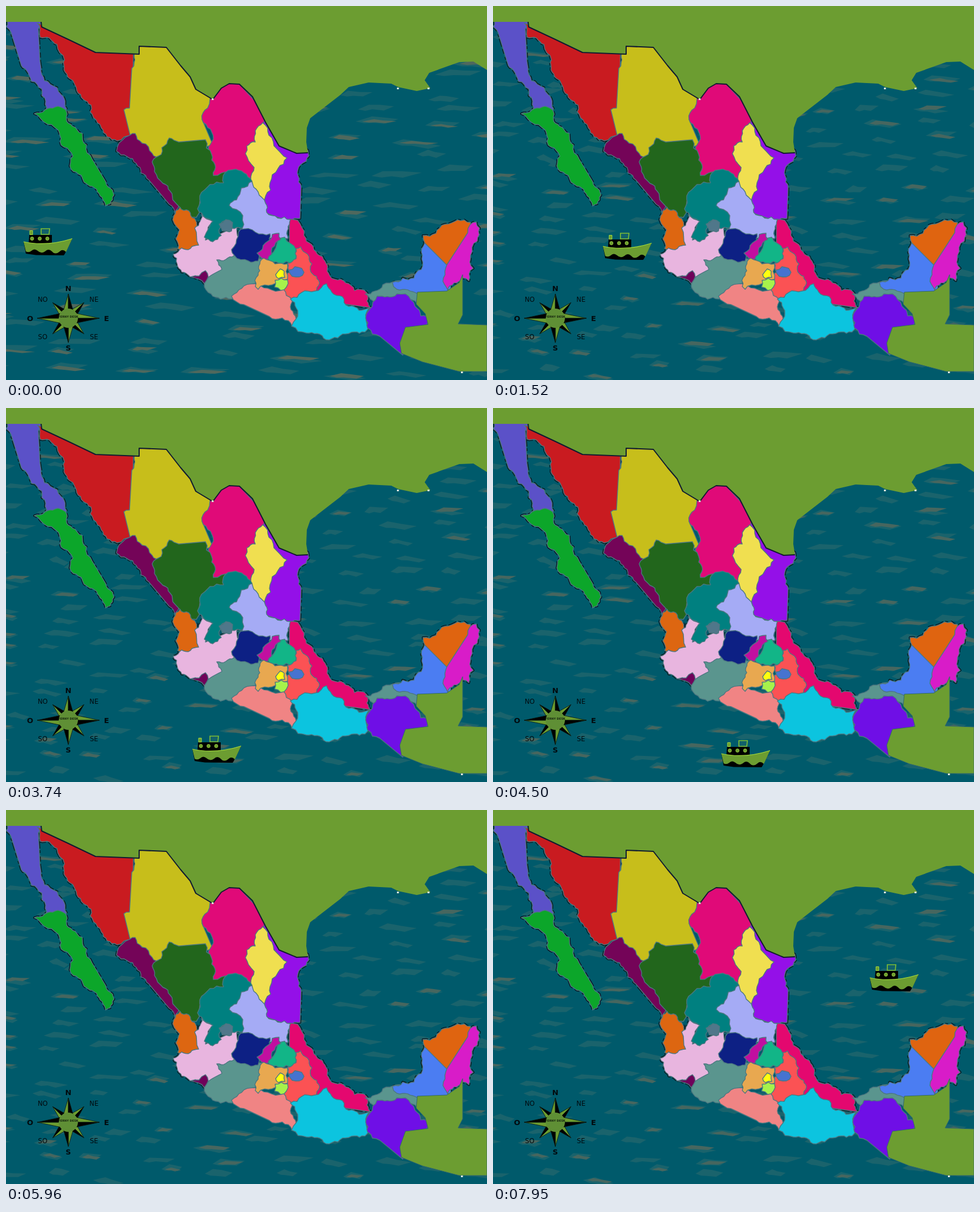
Recreate the animation shown at these times as an HTML page. Size 849 by 660 pixels, loop 8000 ms.

```html
<!DOCTYPE html>
<html lang="es">
<head>
<meta charset="utf-8">
<title>Mapa</title>
<style>
html, body { margin: 0; width: 100%; height: 100%; overflow: hidden; background: #005a6b; }
svg { display: block; width: 100vw; height: 100vh; }
text { font-family: "DejaVu Sans", sans-serif; text-anchor: middle; }
</style>
</head>
<body>
<svg viewBox="0 0 849 660">
  <rect width="849" height="660" fill="#005a6b"/>
  <g id="water"></g>
  <g id="coast" fill="#06131c" stroke="#06131c" stroke-width="4" stroke-linejoin="round" stroke-dasharray="9 4 15 3 5 6"></g>
  <g id="states" stroke="#4d7780" stroke-width="1.4" stroke-linejoin="round"></g>
  <g id="land" fill="#6c9d31"></g>
  <g id="compass" transform="translate(110 551)"></g>
  <g id="boat">
    <path d="M10 13H50V28H9Z"/>
    <path d="M11 5.500H16V12.500H11Z" fill="#6c9d31" stroke="#a5dc3c"/>
    <path d="M31 2H46L45 12H31Z" fill="#12616a" stroke="#7fbd35" stroke-width="1.700"/>
    <g id="ports" fill="#6c9d31" stroke="#a5dc3c" stroke-width=".8"></g>
    <path d="M0 25Q40 34 86 19.500L73 46L71 49L22 48.500L4 46Z"/>
    <path d="M0 25Q40 34 86 19.500L75 43Q69 37 64 42Q56 49 50 42Q44 36 38 42Q31 47 25 41Q19 36 14 41Q9 45 4 42Z" fill="#6c9d31"/>
    <path d="M0 25Q40 34 86 19.500" fill="none" stroke="#a5dc3c" stroke-width="1.200"/>
  </g>
</svg>
<script>
const LOOP = 8000;
const $ = id => document.getElementById(id);

function add(parent, tag, attrs, text) {
  const el = document.createElementNS('http://www.w3.org/2000/svg', tag);
  for (const key in attrs) el.setAttribute(key, attrs[key]);
  if (text) el.textContent = text;
  parent.appendChild(el);
  return el;
}

const parse = s => s.split(' ').map(p => p.split(',').map(Number));
const toPath = pts => 'M' + pts.map(p => p.map(v => v.toFixed(1)).join()).join('L');

function random(seed) {
  return () => (seed = (seed * 16807) % 2147483647) / 2147483647;
}

// Short edges break up into a ragged line; edges over 46 px stay straight.
function ragged([ax, ay], [bx, by]) {
  const dx = bx - ax, dy = by - ay, len = Math.hypot(dx, dy);
  if (len < 8 || len > 46) return [[ax, ay]];
  const bend = Math.sin((ax + bx) * 6.4 + (ay + by) * 39.1) * .16;
  const mid = [(ax + bx) / 2 - dy * bend, (ay + by) / 2 + dx * bend];
  return [...ragged([ax, ay], mid), ...ragged(mid, [bx, by])];
}
const outline = pts => toPath(pts.flatMap((p, i) => ragged(p, pts[(i + 1) % pts.length]))) + 'Z';

// Painted in order: each state covers the loose edge of those before it.
function state(fill, shape, inked) {
  const d = outline(parse(shape));
  if (inked) add($('coast'), 'path', { d });
  add($('states'), 'path', { d, fill });
}
state('#5b51c8', '0,20 62,20 57,40 60,98 78,138 97,156 106,190 70,190 70,168 45,133 27,105 10,50', true);
state('#0ca62a', '69,183 105,183 117,212 142,245 152,270 176,310 188,325 188,342 176,353 171,342 148,318 133,299 115,288 118,265 95,228 72,208 50,190', true);
state('#c91b20', '55,30 158,70 225,80 222,230 196,238 168,215 150,175 125,150 112,128 103,95 90,68 60,55', true);
state('#c7be1b', '219,70 300,60 370,165 346,200 365,245 280,268 262,272 238,240 219,228 208,183 218,180 222,110');
state('#740458', '228,225 210,232 195,256 230,278 252,307 288,350 298,367 305,352 310,310 270,275 258,260 240,242', true);
state('#e00a78', '365,150 400,125 460,190 470,225 445,310 366,310 361,282 363,240 346,200 356,180');
state('#9410e8', '455,190 500,235 533,255 530,274 520,280 521,320 519,375 500,380 455,364 440,340 460,230', true);
state('#f0df50', '453,206 464,228 478,252 496,268 480,287 466,312 467,325 457,348 446,347 432,306 438,285 428,273 425,247 440,240 440,220');
state('#22661c', '288,233 305,240 352,236 363,262 366,299 395,295 395,320 342,345 336,373 308,357 298,346 290,327 277,313 262,292 258,275 274,262 275,250');
state('#e4086f', '500,376 515,378 526,405 550,438 567,468 580,482 615,502 636,505 647,533 590,525 540,505 520,470 500,430', true);
state('#dd6611', '307,355 333,375 342,403 345,424 316,430 303,428 306,395 296,370', true);
state('#e8b5df', '345,364 367,381 352,413 410,388 412,410 400,445 385,465 360,485 325,478 302,455 295,438 310,427 340,422 333,392', true);
state('#008080', '400,289 434,309 430,370 415,392 402,393 388,378 378,385 380,405 365,416 350,408 365,380 352,374 338,358 342,335 360,315 384,312 386,295');
state('#a5abf5', '434,309 445,328 458,348 460,364 502,377 498,410 470,410 414,400 418,370 394,352 407,342');
state('#50778a', '376,385 388,377 400,382 398,397 382,397');
state('#5a958e', '372,448 403,440 455,447 452,470 437,497 398,517 362,508 350,490 358,478 381,465');
state('#0d2084', '414,394 440,399 466,402 468,418 446,435 445,450 428,450 403,440 398,430 410,406');
state('#12b587', '483,410 492,408 512,430 508,452 482,454 462,444 478,420');
state('#c10fa0', '470,403 482,401 485,412 462,447 443,436 458,418');
state('#fb5254', '520,425 540,455 537,465 552,493 545,510 502,520 488,510 500,470 497,454 512,446 512,428');
state('#4673d0', '499,466 510,460 522,463 526,470 518,478 505,477');
state('#f08484', '398,512 437,490 462,498 490,500 505,517 512,552 505,565 465,548 420,527');
state('#e8a850', '455,445 497,455 497,482 470,492 445,500 440,495 445,475');
state('#a6f24b', '475,484 497,483 495,496 485,502 474,496');
state('#ffff10', '484,464 491,468 492,479 481,481 476,474');
state('#6f025a', '326,478 352,467 357,478 350,490', true);
state('#0cc4df', '502,517 545,503 566,490 575,505 605,530 642,533 640,568 605,578 565,589 530,577 504,565 512,552');
state('#5a958e', '634,508 665,492 690,485 727,500 726,526 705,512 655,522');
state('#6f0fe6', '655,512 690,508 705,508 722,530 750,555 720,580 700,616 660,583 638,568 642,535');
state('#4b7df2', '739,418 785,440 785,510 727,508 690,500 682,488 720,480 733,465 735,440', true);
state('#df6410', '736,405 775,385 820,382 820,400 778,457 739,418', true);
state('#d81cc8', '819,386 830,381 836,392 832,415 820,440 817,485 805,480 780,502 778,457 815,400', true);

// Neighbouring land
const border = parse('62,28 63,37 110,59 158,82 235,85 235,71 283,73 308,105 325,125 335,147 365,165 380,145 394,137 412,138 435,160 458,205 482,247 513,260 533,259');
const gulf = parse('530,240 531,215 537,198 590,157 605,143 640,135 680,137 692,143 725,150 749,145 739,131 747,118 800,99 825,98 849,113 849,0 0,0 0,28');
const south = parse('726,505 778,503 800,488 806,474 806,545 798,561 849,563 849,645 800,645 735,628 698,613 695,595 705,567 745,562 740,543 724,526');
add($('land'), 'path', { d: toPath([...border, ...gulf]) + 'Z' });
add($('land'), 'path', { d: toPath(south) + 'Z', stroke: '#31686a' });
add($('land'), 'path', { d: toPath(border), fill: 'none', stroke: '#101b30', 'stroke-width': 2, 'stroke-linejoin': 'round' });
for (const [x, y] of parse('690,144 744,144 803,645 363,163'))
  add($('land'), 'rect', { x, y, width: 3.5, height: 3, fill: '#dfe6dc' });

// Water: rows of long thin streaks, some with a warm core
function streak(rnd, x, y, w, h) {
  const tilt = (rnd() - .5) * h, at = (u, v) => [x + w * u, y + h * v + tilt * u];
  return toPath([at(0, 0), at(.2 + rnd() * .2, -.55), at(.6, -.25 - rnd() * .2), at(1, -.1),
    at(.6 + rnd() * .2, .4), at(.4, .1 + rnd() * .2), at(.2, .25)]) + 'Z';
}

function sea({ seed, length, warmth, brown, drift = 0 }) {
  const g = add($('water'), 'g', {}), rnd = random(seed);
  let teal = '', warm = '';
  for (let y = 38; y < 655; y += 27) {
    for (let x = -80 * rnd(); x < 849; x += length * (1.3 + rnd())) {
      const w = length * (.6 + rnd() * .7), sx = x + drift * (rnd() - .5), sy = y + rnd() * 22;
      teal += streak(rnd, sx, sy, w, 10 + rnd() * 5);
      const core = streak(rnd, sx + w * .15, sy, w * .8, 6 + rnd() * 4);
      if (rnd() < warmth) warm += core;
    }
  }
  add(g, 'path', { d: teal, fill: '#1a636c' });
  add(g, 'path', { d: warm, fill: brown });
  return g;
}

const ripple = { seed: 913, length: 54, warmth: .35, brown: '#47665f' };
const seas = {
  swell: sea({ seed: 71, length: 72, warmth: .5, brown: '#4f685d' }),
  chop: sea(ripple),
  turn: sea({ ...ripple, drift: 8 }),
  calm: sea({ ...ripple, drift: 14, warmth: .28 })
};

// Boat portholes
[15, 28.5, 42].forEach(cx => add($('ports'), 'circle', { cx, cy: 19.5, r: 3 }));

// Compass
const rose = $('compass');
function point(angle, len, wide) {
  const g = add(rose, 'g', { transform: `rotate(${angle})`, stroke: '#0a1a12', 'stroke-width': .8 });
  add(g, 'path', { d: `M0 0L${-wide} ${-wide * 1.3}L0 ${-len}Z`, fill: '#6c9d31' });
  add(g, 'path', { d: `M0 0L${wide} ${-wide * 1.3}L0 ${-len}Z` });
}
for (let a = 45; a < 360; a += 90) point(a, 39, 8);
for (let a = 0; a < 360; a += 90) point(a, a % 180 ? 55 : 43, 9);
add(rose, 'circle', { r: 17, fill: '#5f8f35' });
add(rose, 'text', { y: -1, 'font-size': 5, 'font-weight': 700, fill: '#14240f' }, 'FERNY DESK');
['N', 'NE', 'E', 'SE', 'S', 'SO', 'O', 'NO'].forEach((name, i) => {
  const a = i * Math.PI / 4, main = i % 2 === 0, size = main ? 13 : 11.5;
  add(rose, 'text', {
    x: Math.sin(a) * (main ? 67.5 : 64), y: size * .365 - Math.cos(a) * (main ? 52.5 : 47),
    'font-size': size, 'font-weight': main ? 700 : 400, fill: '#020a0e'
  }, name);
});

// Timeline: each entry holds until the next one
const seaCues = [[0, 'swell'], [990, 'chop'], [1980, 'turn'], [2980, 'calm'], [3970, 'chop'], [4960, 'turn'], [5960, 'calm'], [6960, 'swell'], [7950, 'chop']];
const boatCues = [[0, 31, 391], [760, 120, 392], [1520, 194, 399], [2280], [2980, 240, 576], [3740, 329, 577], [4500, 403, 585], [5260], [7160, 575, 271], [7920, 665, 271]];
const current = (cues, t) => cues.filter(c => c[0] <= t).pop();

function draw(t) {
  const [, now] = current(seaCues, t);
  for (const key in seas) seas[key].style.display = key === now ? '' : 'none';
  const [, x, y] = current(boatCues, t), boat = $('boat');
  boat.style.display = x === undefined ? 'none' : '';
  if (x !== undefined) boat.setAttribute('transform', `translate(${x} ${y})`);
}

const start = performance.now();
function tick() {
  draw((performance.now() - start) % LOOP);
  requestAnimationFrame(tick);
}
tick();
</script>
</body>
</html>
```
